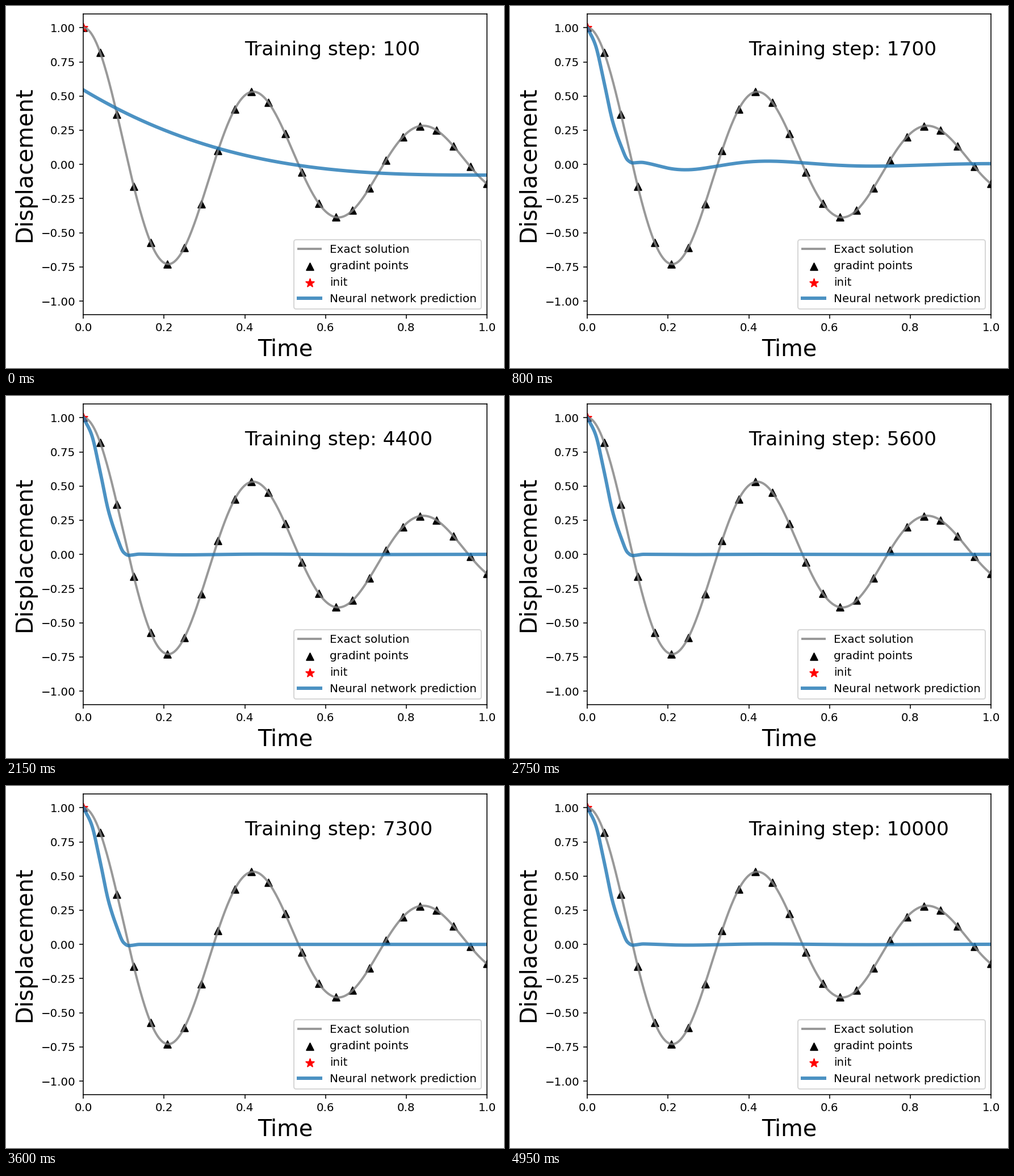
These frames come from a looping animation (877x638 px, 5000 ms). A matplotlib script:

```python
import numpy as np
import matplotlib.pyplot as plt
from matplotlib.animation import FuncAnimation

W, H, DPI = 877, 638, 143.35
FRAMES, INTERVAL = 100, 50
RELAPSE = 8500  # training step at which the fit briefly breaks down

plt.rcParams["font.family"] = "DejaVu Sans"


def exact(t, d=1.5, w0=15):
    """Underdamped oscillator released from rest at 1."""
    w = np.sqrt(w0**2 - d**2)
    phi = np.arctan(-d / w)
    return np.exp(-d * t) * np.cos(phi + w * t) / np.cos(phi)


def smooth(t, *points):
    """Monotone cubic curve through key points, flat at its extrema."""
    x, y = np.array(points).T
    h = np.diff(x)
    d = np.diff(y) / h
    m = np.concatenate([d[:1], np.zeros(len(d) - 1), d[-1:]])
    rising = np.flatnonzero(d[:-1] * d[1:] > 0)
    m[rising + 1] = 2 / (1 / d[rising] + 1 / d[rising + 1])
    i = np.clip(np.searchsorted(x, t, side="right") - 1, 0, len(d) - 1)
    s = (t - x[i]) / h[i]
    return ((1 + 2 * s) * (1 - s)**2 * y[i] + s * (1 - s)**2 * h[i] * m[i]
            + s**2 * (3 - 2 * s) * y[i + 1] + s**2 * (s - 1) * h[i] * m[i + 1])


t = np.linspace(0, 1, 500)

# Untrained guess, collapsed fit, its faint ripple, and the overshooting fit.
start = -.078 + .623 * (1 - t)**2.85
settled = smooth(t, (0, 1), (.02, .88), (.0417, .605), (.0625, .315),
                 (.0833, .125), (.1, .012), (.112, -.009), (.14, 0), (1, 0))
ripple = (-.058 * np.exp(-2.1 * t) * np.minimum(1, t / .2)
          * np.sin(np.pi * (np.sqrt(t) - .42) / .172))
overshoot = smooth(t, (0, .94), (.02, .825), (.09, .025), (.12, -.23),
                   (.175, -.392), (.25, -.215), (.32, 0), (.415, .085),
                   (.6, .017), (1, -.024))
excess = overshoot - settled - ripple


def prediction(step):
    if step < RELAPSE:
        ripple_gain = np.exp((1700 - step) / 1150)
        excess_gain = 1.62 * .5**((step - 400) / 220)
    else:
        ripple_gain = np.exp((RELAPSE - step) / 800)
        excess_gain = .5**((step - RELAPSE) / 80)
    trained = settled + ripple_gain * ripple + excess_gain * excess
    untrained = .5**((step - 100) / 100)
    return untrained * start + (1 - untrained) * trained


fig = plt.figure(figsize=((W + .01) / DPI, (H + .01) / DPI), dpi=DPI,
                 facecolor="white")
ax = fig.add_axes([136.2 / W, (H - 544.2) / H, 711 / W, 530 / H])
ax.set(xlim=(0, 1), ylim=(-1.1, 1.1))
ax.set_xlabel("Time", fontsize=20)
ax.set_ylabel("Displacement", fontsize=20)

ax.plot(t, exact(t), color="grey", linewidth=2, alpha=.8,
        label="Exact solution")
tp = np.linspace(0, 1, 25)
ax.scatter(tp, exact(tp), s=40, color="black", marker="^",
           label="gradint points")
ax.scatter([0], [1], s=58, color="red", marker="*", label="init")
line, = ax.plot(t, start, color="tab:blue", linewidth=3, alpha=.8,
                label="Neural network prediction")
title = ax.text(.4, .797, "", fontsize="xx-large", color="black")
ax.legend(loc="lower right")


def update(i):
    step = 100 * (i + 1)
    line.set_ydata(prediction(step))
    title.set_text(f"Training step: {step}")
    return line, title


anim = FuncAnimation(fig, update, frames=FRAMES, interval=INTERVAL,
                     repeat=True, repeat_delay=0)
plt.show()
```
